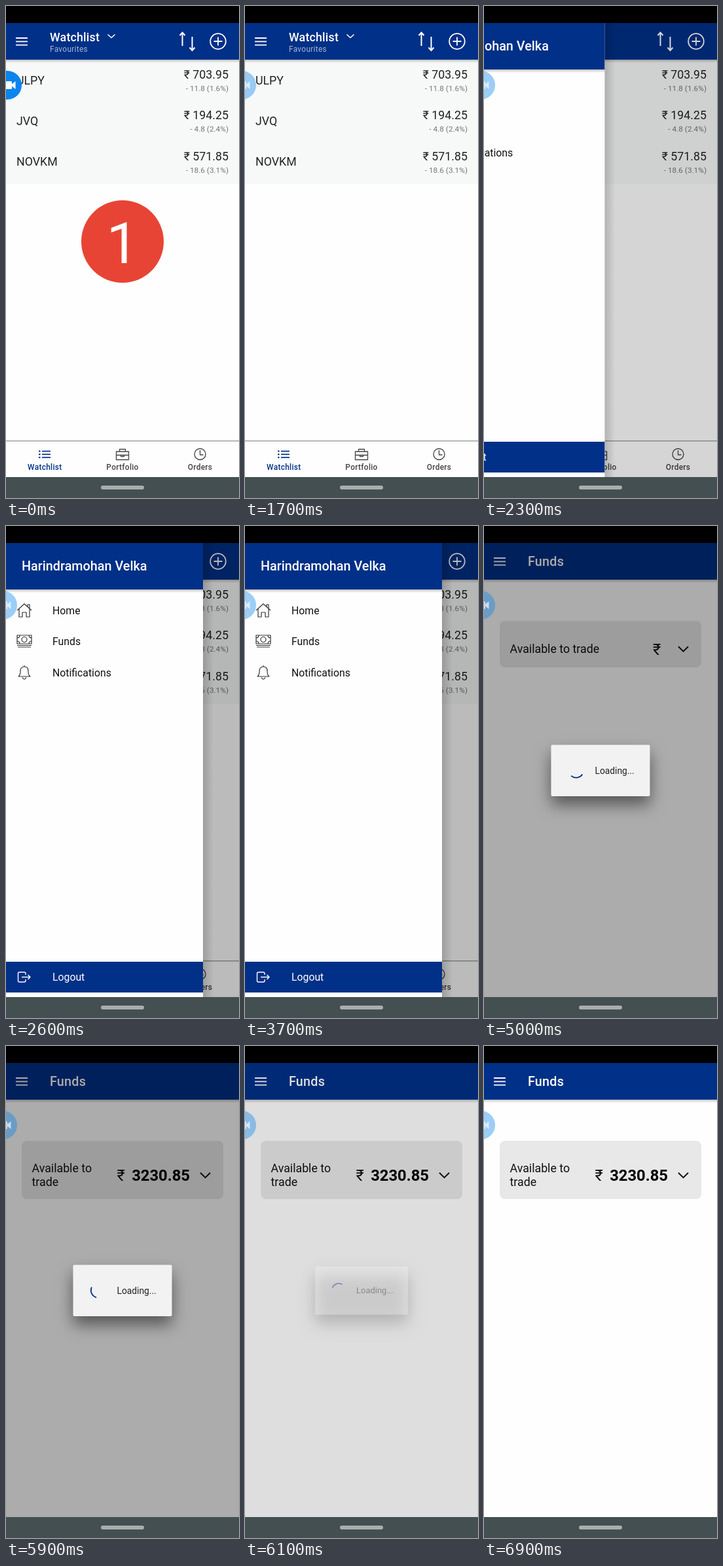
An HTML page with a canvas for the animation above (8000 ms loop, 356 by 752 pixels).

```html
<!DOCTYPE html>
<html lang="en">
<head>
<meta charset="utf-8">
<title>Watchlist and funds</title>
<style>
  html, body { margin: 0; width: 100%; height: 100%; overflow: hidden; background: #000; }
  canvas { display: block; width: 356px; height: 752px; }
</style>
</head>
<body>
<canvas id="stage"></canvas>
<script>
const W = 356, H = 752, LOOP = 8000;
const TOP = 26, BOTTOM = 720, DRAWER = 301;
const BLUE = '#003087', PAPER = '#fdfefd', INK = '#222';
const canvas = document.getElementById('stage');
const ctx = canvas.getContext('2d');
const dpr = window.devicePixelRatio || 1;
canvas.width = W * dpr;
canvas.height = H * dpr;

const clamp = v => Math.max(0, Math.min(1, v));
const span = (t, start, length) => clamp((t - start) / length);
const mix = (a, b, p) => a + (b - a) * p;

function bezier(x1, y1, x2, y2) {
  const at = (a, b, s) => 3 * a * s * (1 - s) ** 2 + 3 * b * s * s * (1 - s) + s ** 3;
  return x => {
    if (x <= 0 || x >= 1) return clamp(x);
    let lo = 0, hi = 1;
    for (let i = 0; i < 24; i++) {
      const mid = (lo + hi) / 2;
      if (at(x1, x2, mid) < x) lo = mid; else hi = mid;
    }
    return at(y1, y2, lo);
  };
}
const easeOut = bezier(0, 0, .2, 1);
const easeInOut = bezier(.42, 0, .58, 1);
const easePage = bezier(.36, .66, .04, 1);

function rect(x, y, w, h, fill, radius = 0) {
  ctx.fillStyle = fill;
  ctx.beginPath();
  ctx.roundRect(x, y, w, h, radius);
  ctx.fill();
}

function disc(x, y, r, fill) {
  ctx.fillStyle = fill;
  ctx.beginPath();
  ctx.arc(x, y, r, 0, Math.PI * 2);
  ctx.fill();
}

function text(str, x, y, size, color, { weight = 400, align = 'left', spacing = 0 } = {}) {
  ctx.font = `${weight} ${size}px Roboto, sans-serif`;
  ctx.letterSpacing = spacing + 'px';
  ctx.textAlign = align;
  ctx.fillStyle = color;
  ctx.fillText(str, x, y);
}

function stroke(path, color, width, x = 0, y = 0) {
  ctx.save();
  ctx.translate(x, y);
  ctx.strokeStyle = color;
  ctx.lineWidth = width;
  ctx.stroke(new Path2D(path));
  ctx.restore();
}

function ring(x, y, r, color, width, from = 0, to = Math.PI * 2) {
  ctx.strokeStyle = color;
  ctx.lineWidth = width;
  ctx.beginPath();
  ctx.arc(x, y, r, from, to);
  ctx.stroke();
}

function shadowBelow(y, width) {
  const g = ctx.createLinearGradient(0, y, 0, y + 5);
  g.addColorStop(0, 'rgba(0,0,0,.22)');
  g.addColorStop(1, 'rgba(0,0,0,0)');
  rect(0, y, width, 5, g);
}

function scrim(alpha) {
  if (alpha > 0) rect(0, TOP, W, BOTTOM - TOP, `rgba(0,0,0,${alpha})`);
}

function header() {
  shadowBelow(82, W);
  rect(0, TOP, W, 56, BLUE);
  stroke('M15 49H33M15 54.3H33M15 59.6H33', '#fff', 1.8);
}

const quotes = [
  ['ULPY', '703.95', '- 11.8 (1.6%)'],
  ['JVQ', '194.25', '- 4.8 (2.4%)'],
  ['NOVKM', '571.85', '- 18.6 (3.1%)']
];

function watchlistPage() {
  rect(0, TOP, W, BOTTOM - TOP, PAPER);
  rect(0, 82, W, 190, '#f7f8f8');
  header();
  text('Watchlist', 67, 54, 17.8, '#fff', { weight: 500, spacing: .2 });
  text('Favourites', 67, 70, 11.9, '#a9b5d0', { spacing: .3 });
  stroke('M155.5 43.5L161 48.5L166.500 43.5', '#fff', 1.6);
  stroke('M269.500 61V41.500M265.500 45L269.500 40.500L273.500 45M284.500 47V67M280.500 63.500L284.500 68L288.500 63.500', '#fff', 2);
  ring(324, 54, 11.8, '#fff', 1.8);
  stroke('M317.500 54H330.500M324 47.500V60.500', '#fff', 1.8);

  quotes.forEach(([symbol, price, change], i) => {
    const y = 62.3 * i;
    text(symbol, 16, 119.8 + y, 17.8, INK);
    text('₹ ' + price, 340, 111 + y, 17.8, INK, { align: 'right' });
    text(change, 340, 130 + y, 11.8, '#777', { align: 'right' });
  });

  rect(0, 664, W, 1.5, '#a2a4a4');
  const label = (str, x, color) =>
    text(str, x, 709, 11.9, color, { weight: 500, align: 'center', spacing: .3 });
  label('Watchlist', 59.3, BLUE);
  label('Portfolio', 178, '#444');
  label('Orders', 296.500, '#444');
  for (const y of [680.5, 685.3, 690]) {
    disc(51.3, y, 1.3, BLUE);
    stroke('M55 0H68', BLUE, 1.7, 0, y);
  }
  ctx.lineJoin = 'round';
  stroke('M-9.500 -4.500H9.500V8H-9.500ZM-4.500 -4.500V-8H4.500V-4.500M-9.500 1H9.500M-2.500 1V3H2.500V1', '#444', 1.3, 178, 685.500);
  ring(296.500, 685, 8.500, '#444', 1.3);
  stroke('M296.500 679V686H301.500', '#444', 1.3);
}

function fundsPage(loaded) {
  rect(0, TOP, W, BOTTOM - TOP, PAPER);
  header();
  text('Funds', 67, 61, 19.8, '#fff', { weight: 500, spacing: .2 });
  rect(24, 145, 308, loaded ? 89 : 71, '#e8e8e8', 8);
  if (loaded) {
    text('Available to', 39.5, 193, 17.8, '#111');
    text('trade', 39.5, 213.5, 17.8, '#111');
    text('₹', 169.5, 206, 23.8, '#111');
    text('3230.85', 281, 206, 23.8, '#000', { weight: 700, align: 'right' });
  } else {
    text('Available to trade', 39.5, 194, 17.8, '#111');
    text('₹', 258, 197, 23.8, '#111');
  }
  stroke('M-7.500 -3.700L0 3.700L7.500 -3.700', '#111', 2, 304.500, loaded ? 197.500 : 188);
}

function drawer(open) {
  if (open <= 0) return;
  ctx.save();
  ctx.beginPath();
  ctx.rect(0, TOP, W, BOTTOM - TOP);
  ctx.clip();
  ctx.translate(DRAWER * (open - 1), 0);
  const shade = ctx.createLinearGradient(DRAWER, 0, DRAWER + 16, 0);
  shade.addColorStop(0, 'rgba(0,0,0,.16)');
  shade.addColorStop(1, 'rgba(0,0,0,0)');
  rect(DRAWER, TOP, 16, BOTTOM - TOP, shade);
  rect(0, TOP, DRAWER, BOTTOM - TOP, PAPER);
  shadowBelow(97, DRAWER);
  rect(0, TOP, DRAWER, 71, BLUE);
  rect(0, 666, DRAWER, 47, BLUE);
  text('Harindramohan Velka', 24, 68, 19.8, '#fff', { weight: 500 });
  ['Home', 'Funds', 'Notifications'].forEach((item, i) =>
    text(item, 71, 134.7 + 47.6 * i, 15.8, '#111'));
  text('Logout', 71, 695, 15.8, '#fff');

  const line = '#333';
  ctx.lineJoin = 'round';
  stroke('M-11 0L0 -10L11 0M5 -6V-9H8V-3M-8 -2V10H-3V3H3V10H8V-2', line, 1.2, 28, 129);
  stroke('M-11 -9H11V4H-11ZM-11 6.500H11M-10 9H10M-11 -5Q-7 -5 -7 -9M7 -9Q7 -5 11 -5M-11 0Q-7 0 -7 4M7 4Q7 0 11 0', line, 1.2, 28, 176);
  ring(28, 173.5, 4, line, 1.2);
  stroke('M-9 6Q-6 4 -6 -2Q-6 -9 0 -9Q6 -9 6 -2Q6 4 9 6ZM-3 7.500Q0 13 3 7.500M0 -9V-11', line, 1.2, 28, 224);
  stroke('M30 686V684Q30 682 28 682H20.500Q18.500 682 18.500 684V695Q18.500 697 20.500 697H28Q30 697 30 695V693M24 689.500H37M33.500 686L37 689.500L33.500 693', '#fff', 1.4);
  ctx.restore();
}

function loading(t, alpha, scale) {
  if (alpha <= 0) return;
  ctx.save();
  ctx.globalAlpha = alpha;
  ctx.translate(178, 373.5);
  ctx.scale(scale, scale);
  ctx.translate(-178, -373.5);
  ctx.shadowColor = 'rgba(0,0,0,.5)';
  ctx.shadowBlur = 24 * dpr;
  ctx.shadowOffsetY = 13 * dpr;
  rect(102.5, 334.5, 151, 78.500, '#f1f2f1', 2);
  ctx.shadowColor = 'transparent';
  const mid = (83 + (t - 5000) * 360 / 750) * Math.PI / 180;
  ring(141, 373.5, 11.2, BLUE, 1.8, mid - .88, mid + .88);
  text('Loading...', 169.5, 378.5, 13.8, '#222');
  ctx.restore();
}

function bubble(t) {
  const p = easeInOut(span(t, 100, 450));
  ctx.save();
  ctx.globalAlpha = mix(1, .4, p);
  ctx.translate(mix(2, -5, p), 121);
  disc(0, 0, 22, '#0c84ee');
  ctx.restore();
  // The camera glyph stays brighter than its faded disc.
  ctx.save();
  ctx.globalAlpha = mix(1, .65, p);
  ctx.translate(mix(2, -5, p), 121);
  rect(-5, -6, 12, 12, '#fff', 1.5);
  ctx.beginPath();
  ctx.moveTo(7, -1.5);
  ctx.lineTo(12.5, -6);
  ctx.lineTo(12.5, 6);
  ctx.lineTo(7, 1.5);
  ctx.fill();
  ctx.restore();
}

function systemBars() {
  rect(0, 0, W, TOP, '#000');
  rect(0, BOTTOM, W, H - BOTTOM, '#434f50');
  rect(145, 733, 66, 6, '#aaadad', 3);
}

function draw(t) {
  ctx.setTransform(dpr, 0, 0, dpr, 0, 0);
  ctx.lineJoin = 'miter';
  const page = easePage(span(t, 4200, 280));
  if (page < 1) watchlistPage();
  if (page > 0) {
    ctx.save();
    ctx.beginPath();
    ctx.rect(0, TOP, W, BOTTOM - TOP);
    ctx.clip();
    ctx.globalAlpha = page;
    ctx.translate(0, 40 * (1 - page));
    fundsPage(t >= 5900);
    ctx.restore();
  }

  const open = t < 4000
    ? easeOut(span(t, 2224, 280))
    : 1 - easeInOut(span(t, 4100, 280));
  scrim(.265 * open);
  drawer(open);

  const enter = easeInOut(span(t, 4420, 200));
  const leave = easeInOut(span(t, 5988, 200));
  const shown = enter * (1 - leave);
  scrim(.325 * shown);
  loading(t, shown, 1.1 - .1 * enter - .1 * leave);

  systemBars();
  if (t < 100) {
    disc(178, 360, 63, '#e84435');
    text('1', 178, 393, 87, '#fff', { align: 'center' });
  }
  bubble(t);
}

function tick() {
  draw(performance.now() % LOOP);
  requestAnimationFrame(tick);
}
tick();
</script>
</body>
</html>
```
